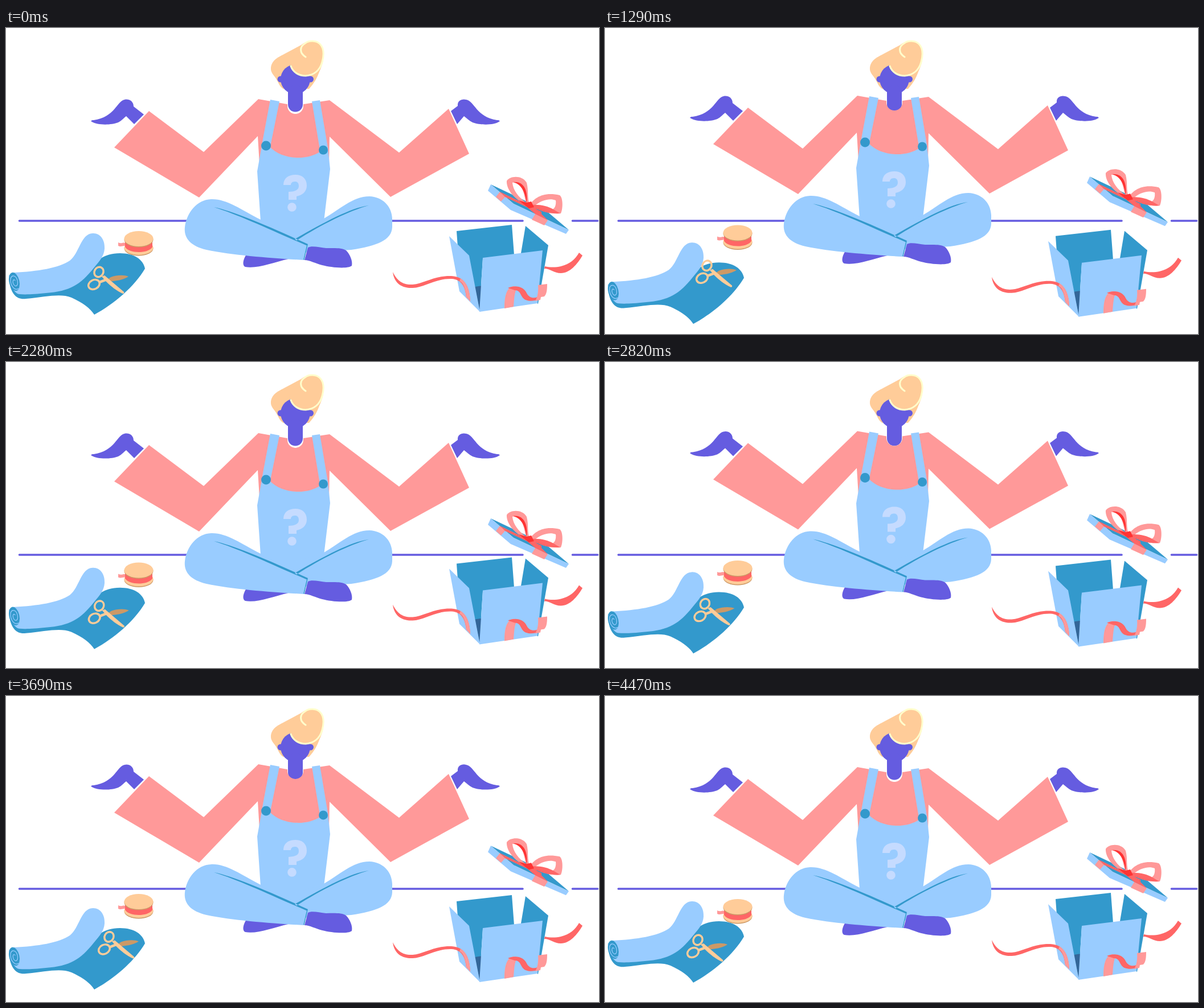
Write an HTML page that moves like this. It is 1041 px wide and 538 px high and loops after 4500 ms.

```html
<!DOCTYPE html>
<html lang="en">
<head>
<meta charset="utf-8">
<title>Open box</title>
<style>
  html, body { margin: 0; width: 100%; height: 100%; overflow: hidden; background: #fff; }
  svg { display: block; width: 100%; height: 100%; }
  .violet { fill: #655ce0; }
  .light { fill: #9cf; }
  .blue { fill: #39c; }
  .pink { fill: #f99; }
  .red { fill: #f66; }
  .deep { fill: #f33; }
  .peach { fill: #fc9; }
  .tan { fill: #c96; }
  .line { fill: none; stroke-linecap: round; stroke-linejoin: round; }
</style>
</head>
<body>
<svg viewBox="0 0 1041 538">
  <path class="line" stroke="#655ce0" stroke-width="3.6" d="M23.500 339H907M994.500 339H1038.500"/>

  <g id="head">
    <path class="peach" d="M465 72C465 58 476 52 488 46L518 30C530 20 550 20 556 38C560 52 555 66 550 77C546 88 541 97 532 107H487C480 104 478 94 472 86C467 80 465 76 465 72Z"/>
    <g class="violet">
      <circle cx="508" cy="90" r="26"/>
      <circle cx="482" cy="90" r="5.500"/>
      <circle cx="534.500" cy="90" r="5.500"/>
      <rect x="495" y="100" width="26" height="47.500" rx="13"/>
    </g>
    <path class="peach" d="M500 66C504 78 514 84 526 84C541 83 551 74 555 60C559 45 557 34 551 28C545 22 532 21 525 27L496 50Z"/>
    <path class="line" stroke="#ffc" stroke-width="3" d="M500 67C504 78 514 84 526 84C541 83 551 74 555 60C559 45 557 34 551 28C545 22 532 21 525 27C515 33 515 44 526 51"/>
  </g>

  <g id="body">
    <g class="violet">
      <path d="M242 152L224 138C224 128 215 124 208 126C195 128 191 157 154 162C149 162 148 164 151 165C160 171 185 171 197 166C203 163 207 158 211 155L225 169Z"/>
      <path d="M781 146L793 137C792 127 801 124 808 126C822 128 826 157 862 162C867 162 868 164 865 165C857 171 831 171 819 166C813 163 808 158 804 155L792 169Z"/>
      <path d="M422 398C415 409 415 418 420 420C440 424 470 412 496 406Z"/>
    </g>
    <path class="pink" d="M443 125L494 134V137A14 14 0 0 0 522 137V134L568 127L690 219L777 142L813 221L675 297L568 191L567 240H445L442 190L339 298L190 210L251 146L347 218Z"/>
    <g class="light">
      <path d="M464 126L480 129L464 208L449 206Z"/>
      <path d="M537 129L551 127L565 211L551 214Z"/>
      <path d="M449 207Q453 204 462 208C485 233 530 233 552 217Q560 215 565 210L569 248L558 340L520 376L447 340L441 252Z"/>
      <path d="M558 335C585 320 608 296 638 296C660 297 677 312 678 335V350C677 373 652 383 606 390L520 395L480 360Z"/>
      <path d="M314 350C317 325 335 302 360 301C387 300 412 319 447 337L529 381L523 408C470 405 400 400 352 390C322 383 312 368 314 350Z"/>
    </g>
    <path class="blue" d="M365 315C400 322 460 348 530 380L528 382.500C462 354 410 329 365 315ZM637 312C605 316 560 341 507 371L510 373.500C553 346 603 321 637 312Z"/>
    <path class="line" stroke="#39c" stroke-width="1.400" d="M529 381L523 407"/>
    <path class="violet" d="M530 386C537 382 550 386 562 387C577 387 590 386 597 391C604 398 609 410 607 418C600 424 570 421 555 417C543 414 533 408 524 408Z"/>
    <circle class="blue" cx="456.500" cy="207" r="8.500"/>
    <circle class="blue" cx="557" cy="214.500" r="8"/>
    <g fill="#c5dbff">
      <path d="M487 276C487 264 496 258 508 258C520 258 528 265 528 277C528 288 520 294 510 296V302H496V288C508 288 514 284 514 278C514 272 511 270 507 270C502 270 500 273 500 276Z"/>
      <circle cx="502" cy="315" r="7.800"/>
    </g>
  </g>

  <g id="fabric">
    <path class="blue" d="M5 440C8 470 20 478 35 476C70 473 95 466 115 474C135 483 148 493 155 504C190 485 225 455 244 423C241 407 225 396 200 396C185 396 175 400 168 404L100 450Z"/>
    <path class="light" d="M14 430C55 428 93 422 112 409C129 396 131 362 152 361C165 360 174 372 173 388C172 401 165 409 154 422C131 451 112 463 70 466C50 468 35 469 24 468C15 468 5 450 5 435Z"/>
    <ellipse class="blue" cx="14.500" cy="446" rx="9" ry="16.500" transform="rotate(-13 14.500 446)"/>
    <path class="line" stroke="#9cf" stroke-width="1.200" d="M22 458C15 463 7 452 8 441C10 433 18 435 20 444C22 453 17 457 13 450C11 445 13 440 16 444"/>
  </g>

  <g id="scissors">
    <path class="tan" d="M177 443L184 438C195 434 208 434 215 437C206 443 192 445 178 446Z"/>
    <path class="peach" d="M163 445L176 440L178 444L165 449ZM168 437L173 435L180 441L207 464Q208 467 205 467C194 462 184 454 176 446Z"/>
    <g class="line" stroke="#fc9" stroke-width="3.400">
      <ellipse cx="154.500" cy="451" rx="10.300" ry="8" transform="rotate(-28 154.500 451)"/>
      <ellipse cx="163" cy="429" rx="9" ry="7.800" transform="rotate(-60 163 429)"/>
    </g>
  </g>

  <g id="spool">
    <path class="pink" d="M197 377C202 380 206 376 211 378V384C206 381 203 386 197 383Z"/>
    <ellipse class="tan" cx="233" cy="387.500" rx="25.500" ry="13"/>
    <ellipse class="peach" cx="233" cy="386" rx="25.500" ry="13"/>
    <path class="red" d="M209 371H257V385C250 397 216 397 209 385Z"/>
    <ellipse class="tan" cx="233" cy="372" rx="25.500" ry="13.500"/>
    <ellipse class="peach" cx="233" cy="370.500" rx="25.500" ry="13.500"/>
  </g>

  <g id="box">
    <path class="blue" d="M791 357L888 346L892 399L837 406L831 497L793 385ZM912 348L952 382L934 485L900 460L904 396Z"/>
    <path fill="#369" d="M823 455L836 453L832 499Z"/>
    <path class="light" d="M778 366L813 400L832 499L796 463ZM837 404L942 391L933 484L831 499Z"/>
    <path class="red" d="M679 429C686 443 695 452 714 451C735 449 752 435 782 436C805 437 814 455 815 480L808 473C806 455 800 442 782 441C755 440 735 456 714 457C692 458 681 446 679 429ZM946 419C955 421 965 421 974 419C990 415 999 407 1006 395L1012 400C1003 415 990 431 974 431C962 431 955 423 945 423Z"/>
    <path class="pink" d="M798 440C810 448 815 465 815 481L808 473C806 456 802 447 796 445Z"/>
    <path class="pink" d="M875 493C875 470 879 456 891 454L897 457C892 466 892 480 891 490Z"/>
    <path class="red" d="M881 457C895 451 909 455 914 466C918 474 925 476 933 473L935 477C928 480 920 481 912 478C902 473 905 461 893 461Z"/>
    <path class="pink" d="M934 452L950 450C950 461 949 468 945 472L939 473L938 478L929 480C933 474 935 462 934 452Z"/>
  </g>

  <g id="lid">
    <path class="blue" d="M851 275L948 321L988 355L891 309Z"/>
    <path class="light" d="M851 275L846 286L886 320L983 362L988 355L891 309Z"/>
    <path class="pink" d="M867 288L876 297L869 305L860 297ZM929 327L951 338L945 347L923 337Z"/>
    <path class="red" d="M867 288L940 323V327L876 297ZM929 327L905 307L922 309L951 338Z"/>
    <path class="pink" fill-rule="evenodd" d="M917 312C894 304 878 284 879 269C884 260 906 258 914 272C918 287 914 298 920 312ZM889 272C897 268 905 275 908 287L913 307C900 298 890 285 889 272Z"/>
    <path class="deep" d="M890 271C908 268 917 285 914 308C912 293 907 275 890 271Z"/>
    <path class="pink" fill-rule="evenodd" d="M919 311C927 300 942 287 972 294C978 298 978 318 974 326C955 328 937 321 919 311ZM930 311C942 302 955 299 965 303C966 310 964 317 959 319C948 314 940 312 930 311Z"/>
    <path class="red" d="M920 311C940 310 950 313 961 319L973 326C955 327 937 323 920 311Z"/>
    <path class="deep" d="M900 303L914 307L922 305L927 315L918 317Z"/>
  </g>
</svg>
<script>
const LOOP = 4500, STEP = LOOP / 4, LEAD = 20;

// Offsets at each quarter of the loop, starting from the rest pose.
const tracks = {
  body: { y: [0, -6.4, 0, -6.4] },
  lid: { y: [0, -14.6, 0, -14.6] },
  box: { y: [0, 9.6, -2.6, 5] },
  fabric: { y: [0, 17.4, 0.7, 15] },
  spool: { y: [0, -10.9, -4.4, -11.2] },
  scissors: { x: [0, 17, 0.6, 22.5], y: [0, -12, -0.3, -7] }
};

function sample(keys, time) {
  if (!keys) return 0;
  const place = time / STEP, i = Math.floor(place);
  const ease = (1 - Math.cos(Math.PI * (place - i))) / 2;
  const from = keys[i % 4], to = keys[(i + 1) % 4];
  return from + (to - from) * ease;
}

const parts = Object.entries(tracks).map(([id, track]) => [document.getElementById(id), track]);

function draw(now) {
  const time = (now + LEAD) % LOOP;
  for (const [node, { x, y }] of parts) {
    node.setAttribute('transform', `translate(${sample(x, time).toFixed(2)} ${sample(y, time).toFixed(2)})`);
  }
}

let start;
function tick(now) {
  start ??= now;
  draw(now - start);
  requestAnimationFrame(tick);
}
draw(0);
requestAnimationFrame(tick);
</script>
</body>
</html>
```
